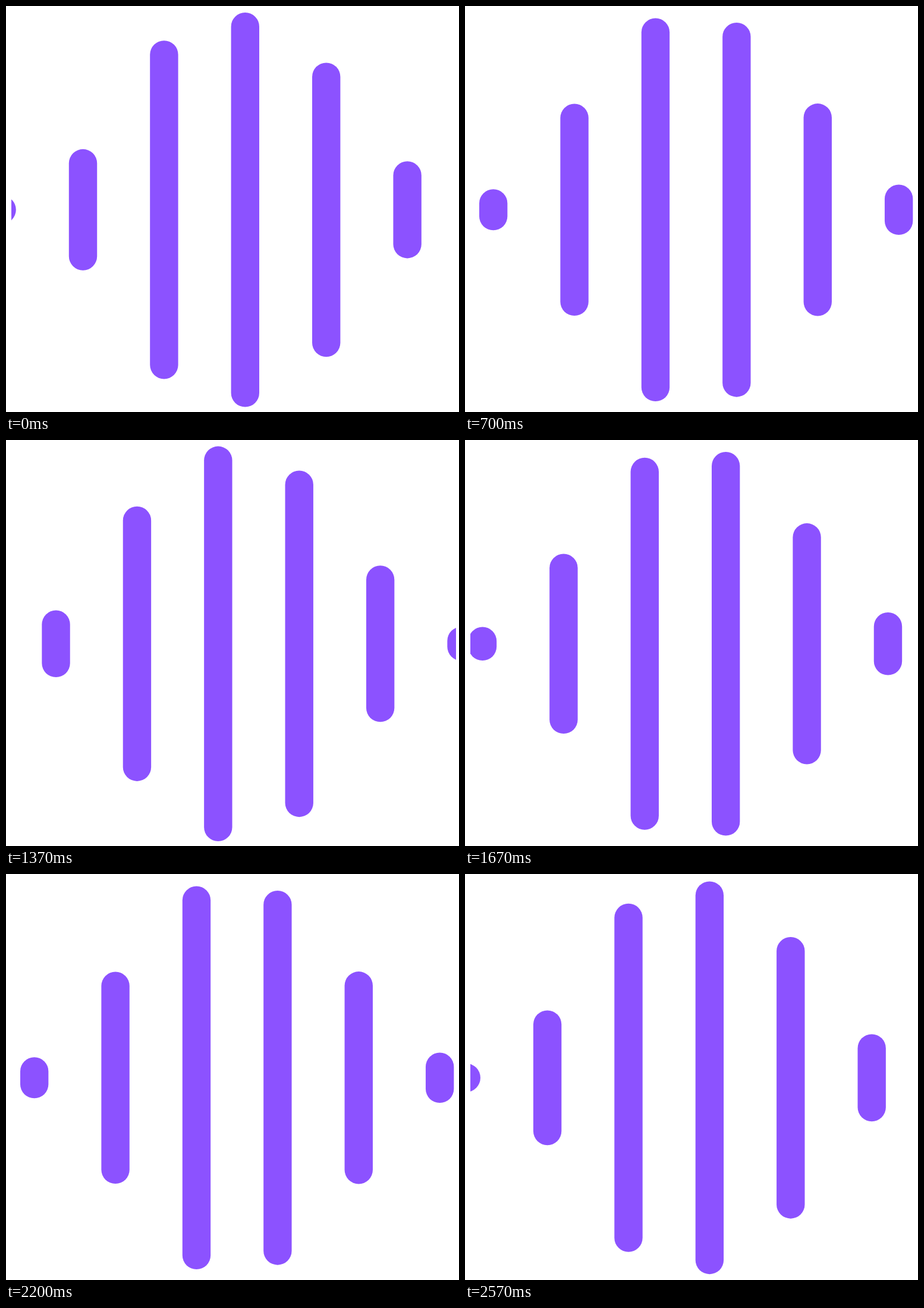
Animation of 762x683 px, one loop 2610 ms. Source, as an HTML page with a canvas:

```html
<!DOCTYPE html>
<html lang="en">
<head>
<meta charset="utf-8">
<title>Sound wave</title>
<style>
  html, body { margin: 0; width: 100%; height: 100%; overflow: hidden; background: #fff; }
  canvas { display: block; width: 762px; height: 683px; }
</style>
</head>
<body>
<canvas id="stage" width="762" height="683"></canvas>
<script>
const ctx = document.getElementById('stage').getContext('2d');
const LOOP = 2610, CYCLE = 15;
const BARS = 6, GAP = 136.4, FIRST = -6.9;
const RADIUS = 23.7, PEAK = 333.3, MID = 342.8;
const RISE = { mid: 184.2, span: 380 };
const FALL = { mid: 593.4, span: 428 };

// cubic-bezier(0.455, 0, 0.545, 1), solved for x by bisection
function ease(x) {
  if (x <= 0) return 0;
  if (x >= 1) return 1;
  let lo = 0, hi = 1;
  for (let i = 0; i < 24; i++) {
    const s = (lo + hi) / 2, r = 1 - s;
    const at = 3 * r * s * (0.455 * r + 0.545 * s) + s * s * s;
    if (at < x) lo = s; else hi = s;
  }
  return lo * lo * (3 - 2 * lo);
}

const progress = (x, { mid, span }) => ease((x - mid) / span + 0.5);

// Bars grow towards the middle of the stage and shrink after it
function halfHeight(x) {
  return RADIUS + (PEAK - RADIUS) * (progress(x, RISE) - progress(x, FALL));
}

// Two poses per 100 ms: one held for 70 ms, the next for 30 ms
function stepAt(ms) {
  const t = Math.min(ms % LOOP, 2599);
  return 3 * Math.floor(t / 100) + (t % 100 >= 70 ? 1 : 0);
}

function draw(ms) {
  const shift = (stepAt(ms) % CYCLE) / CYCLE * GAP;
  ctx.fillStyle = '#fff';
  ctx.fillRect(0, 0, 762, 683);
  ctx.save();
  ctx.beginPath();
  ctx.rect(9, 0, 748, 683);
  ctx.clip();
  ctx.fillStyle = '#8c52ff';
  for (let i = 0; i < BARS; i++) {
    const x = FIRST + shift + i * GAP, h = halfHeight(x);
    ctx.beginPath();
    ctx.roundRect(x - RADIUS, MID - h, 2 * RADIUS, 2 * h, RADIUS);
    ctx.fill();
  }
  ctx.restore();
}

const start = performance.now();
function tick() {
  draw(performance.now() - start);
  requestAnimationFrame(tick);
}
tick();
</script>
</body>
</html>
```
